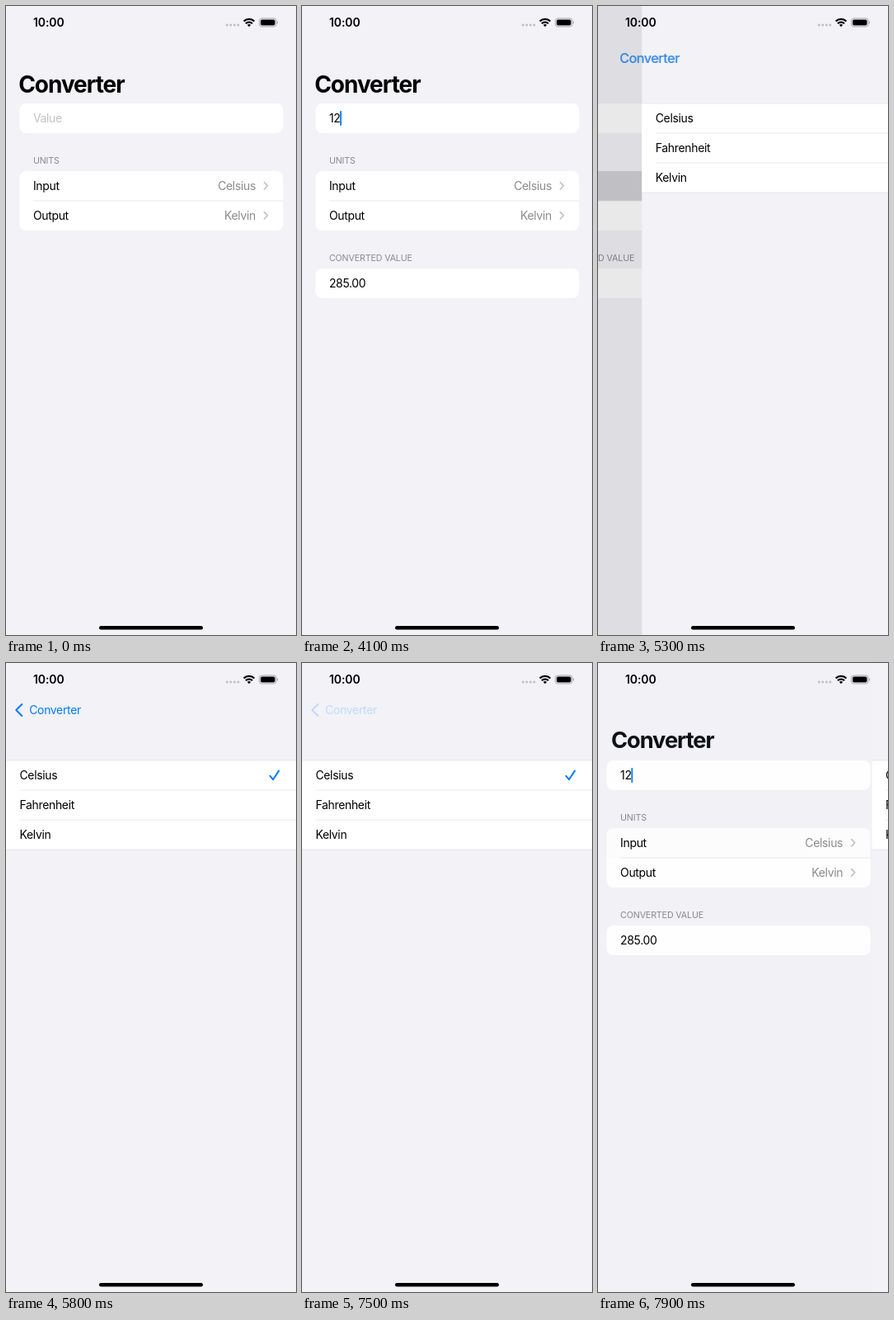
Animation, 352 px wide and 762 px high, one loop 8000 ms. Source, as an HTML page:

```html
<!DOCTYPE html>
<html lang="en">
<head>
<meta charset="utf-8">
<title>Converter</title>
<style>
  html, body { margin: 0; height: 100%; overflow: hidden; background: #f2f2f7; }
  svg { display: block; width: 100%; height: 100%; }
  text { font: 14px Inter, Roboto, sans-serif; font-optical-sizing: none; letter-spacing: -.34px; white-space: pre; }
  .caps { font-size: 10.7px; letter-spacing: -.15px; fill: #8a8a8e; }
  .grey { fill: #8a8a8e; text-anchor: end; }
  .large { font-size: 28px; font-weight: 700; letter-spacing: -1.05px; }
  .clock { font-weight: 600; letter-spacing: -.1px; }
  .card { fill: #fff; }
  .line { stroke: #e4e4e8; stroke-width: .8; }
  .blue { fill: #007aff; }
  .stroke { fill: none; stroke: #007aff; stroke-width: 2; stroke-linecap: round; stroke-linejoin: round; }
  .more { stroke: #c0c0c4; stroke-width: 1.6; }
  .press { fill: #d1d1d6; }
</style>
</head>
<body>
<svg viewBox="0 0 352 762" preserveAspectRatio="none">
  <g id="form">
    <rect class="card" x="16.4" y="118" width="320" height="36" rx="8"/>
    <text id="entry" x="32.9" y="141"></text>
    <rect id="caret" class="blue" y="127" width="1.8" height="18" rx=".8"/>

    <text class="caps" x="32.9" y="191.4">UNITS</text>
    <rect class="card" x="16.4" y="200" width="320" height="72" rx="8"/>
    <path id="inputPress" class="press" d="M16.4 236V208a8 8 0 0 1 8-8H328.4a8 8 0 0 1 8 8V236Z"/>
    <path class="line" d="M32.9 236H336.4"/>
    <text x="32.9" y="223">Input</text>
    <text class="grey" x="303" y="223">Celsius</text>
    <path class="stroke more" d="M313.5 213.6l4 4.2-4 4.2"/>
    <text x="32.9" y="259">Output</text>
    <text class="grey" x="303" y="259">Kelvin</text>
    <path class="stroke more" d="M313.5 249.6l4 4.2-4 4.2"/>

    <g id="converted">
      <text class="caps" x="32.9" y="309.4">CONVERTED VALUE</text>
      <rect class="card" x="16.4" y="318" width="320" height="36" rx="8"/>
      <text id="result" x="32.9" y="341"></text>
    </g>
  </g>
  <rect id="shade" width="352" height="762"/>

  <g id="picker">
    <rect width="352" height="762" fill="#f2f2f7"/>
    <rect class="card" y="118" width="352" height="108"/>
    <rect id="rowPress" class="press" y="118" width="352" height="36"/>
    <path class="line" d="M0 118H352M16.4 154H352M16.4 190H352M0 226H352"/>
    <text x="16.4" y="141">Celsius</text>
    <text x="16.4" y="177">Fahrenheit</text>
    <text x="16.4" y="213">Kelvin</text>
    <path class="stroke" d="M320.5 136.8l3.6 4.4 7-10.6"/>
  </g>

  <path id="backArrow" class="stroke" d="M19.3 50l-7 7 7 7"/>
  <text id="largeTitle" class="large">Converter</text>
  <text id="backTitle" class="blue">Converter</text>

  <text class="clock" x="33" y="25">10:00</text>
  <g fill="#bfbfc4">
    <circle cx="268.3" cy="23" r="1.5"/><circle cx="272.8" cy="23" r="1.5"/>
    <circle cx="277.3" cy="23" r="1.5"/><circle cx="281.8" cy="23" r="1.5"/>
  </g>
  <path fill="none" stroke="#000" stroke-width="2.2" d="M288.6 18.6a9 9 0 0 1 12.8 0M291 21.3a5.6 5.6 0 0 1 8 0"/>
  <path d="M292.9 23a3 3 0 0 1 4.2 0l-2.1 2.2Z"/>
  <rect x="307.5" y="15" width="20.5" height="10" rx="3" fill="none" stroke="#a5a5a9"/>
  <rect x="309" y="16.5" width="17.5" height="7" rx="1.8"/>
  <path d="M329 18.2a2 2 0 0 1 0 3.6Z" fill="#a5a5a9"/>
  <rect x="113" y="751" width="126" height="4.4" rx="2.2"/>
</svg>
<script>
const WIDTH = 352, LOOP = 8000, STEP = 100;
const PUSH = 5090, POP = 7611;
const caretKeys = [
  [2000, 1], [2650, 1], [2800, 0], [3099, 0], [3100, 1], [3650, 1], [3800, 0],
  [3950, 0], [4100, 1], [4550, 1], [4700, 0], [4999, 0], [5000, 1], [LOOP, 1]
];

const $ = id => document.getElementById(id);
const set = (id, name, value) => $(id).setAttribute(name, value);
const mix = (a, b, p) => a + (b - a) * p;
const during = (t, from, to) => t >= from && t < to;

// Critically damped spring from 0 to 1
function spring(ms) {
  const x = Math.max(0, ms) * .016;
  return 1 - (1 + x) * Math.exp(-x);
}

function sample(keys, t) {
  if (t < keys[0][0]) return 0;
  const i = keys.findIndex(key => key[0] > t);
  const [t0, a] = keys[i - 1], [t1, b] = keys[i];
  return mix(a, b, (t - t0) / (t1 - t0));
}

function draw(t) {
  const entry = t < 2200 ? '' : t < 3100 ? '1' : '12';
  const p = spring(t - PUSH) - spring(t - POP);

  $('entry').textContent = entry || 'Value';
  set('entry', 'fill', entry ? '#000' : '#c4c4c7');
  set('caret', 'x', [32.8, 40, 46.2][entry.length]);
  set('caret', 'opacity', sample(caretKeys, t));
  set('converted', 'opacity', entry ? 1 : 0);
  $('result').textContent = (+entry + 273).toFixed(2);

  set('inputPress', 'opacity', during(t, 5000, POP) ? 1 : p);
  set('rowPress', 'opacity', during(t, 6500, 6600) ? 1 : 0);

  set('form', 'transform', `translate(${-.3 * WIDTH * p})`);
  set('shade', 'opacity', .1 * p);
  set('picker', 'transform', `translate(${WIDTH * (1 - p)})`);

  // The large title shrinks into the back button while the two cross-fade
  const shrink = 62 / 129, scale = mix(1, shrink, p);
  const place = `translate(${mix(15.2, 28.2, p)} ${mix(105, 62, p)})`;
  const pressed = during(t, 7500, POP) ? .2 : 1;
  set('largeTitle', 'transform', `${place} scale(${scale})`);
  set('largeTitle', 'opacity', 1 - p);
  set('backTitle', 'transform', `${place} scale(${scale / shrink})`);
  set('backTitle', 'opacity', p * pressed);
  set('backArrow', 'opacity', Math.max(0, (p - .86) / .14) * pressed);
}

function tick() {
  const t = performance.now() % LOOP;
  draw(Math.floor(t / STEP) * STEP);
  requestAnimationFrame(tick);
}
tick();
</script>
</body>
</html>
```
